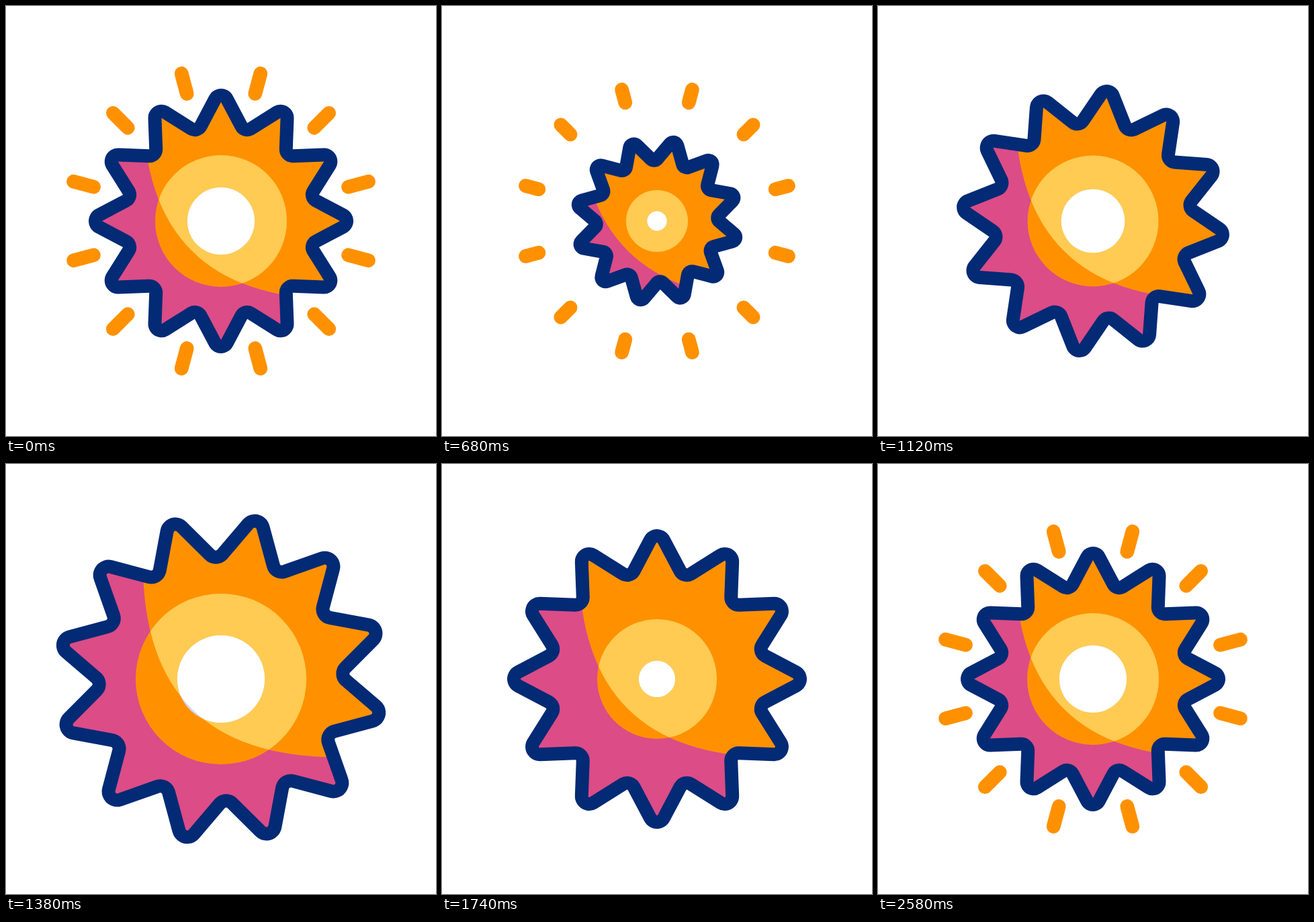
Animation of 640 by 640 pixels, one loop 2780 ms. Source, as an HTML page with a canvas:

```html
<!DOCTYPE html>
<html lang="en">
<head>
<meta charset="utf-8">
<title>Sun</title>
<style>
  html, body { margin: 0; width: 100%; height: 100%; overflow: hidden; background: #fff; }
  canvas { display: block; width: 640px; height: 640px; }
</style>
</head>
<body>
<canvas id="stage" width="640" height="640"></canvas>
<script>
const ctx = document.getElementById('stage').getContext('2d');
const LOOP = 2780, START = 220, END = 2580;
const TAU = Math.PI * 2, STEP = TAU / 12;
const NAVY = '#032a75', ORANGE = '#ff9100', PINK = '#dc4c87', YELLOW = '#ffcb52', LILAC = '#d2d8fa';

const smooth = x => x * x * (3 - 2 * x);
const soft = x => (x + smooth(x)) / 2;

// Eases from a to b while t runs from t0 to t1
function ramp(t, t0, t1, a, b, ease = smooth) {
  const x = Math.min(1, Math.max(0, (t - t0) / (t1 - t0)));
  return a + (b - a) * ease(x);
}

// Shrink, swell, dip, rebound, rest; inner parts run ahead by `lead`
function pulse(t, lead, low, dip, rebound) {
  const lowAt = 620 - lead, highAt = 1560 - lead, high = 1.4;
  if (t < lowAt) return ramp(t, START, lowAt, 1, low);
  if (t < highAt) return ramp(t, lowAt, highAt, low, high, soft);
  if (t < 1740) return ramp(t, highAt, 1740, high, dip);
  if (t < 2140) return ramp(t, 1740, 2140, dip, rebound, soft);
  return ramp(t, 2140, END, rebound, 1, soft);
}

// Winds back, then swings forward to an equal pose
const turn = t => t < 805 ? ramp(t, START, 805, 0, -20) : ramp(t, 805, 1628, -20, 60);

// Rays draw in, shoot away as dots, and later return from outside
function rayEnd(t, rest, near) {
  const windUp = x => x * x * (2.2 * x - 1.2);
  if (t < 720) return ramp(t, START, 720, rest, near, windUp);
  if (t < 1080) return ramp(t, 720, 1080, near, 310);
  return ramp(t, 1980, 2570, 261, rest);
}

// Twelve rounded tips joined to rounded valleys by their common tangents
function starPath(scale, angle) {
  const tip = 177 * scale, valley = 151 * scale, r = 10 * scale;
  const dx = valley * Math.cos(STEP / 2) - tip, dy = valley * Math.sin(STEP / 2);
  const w = Math.atan2(dy, dx) - Math.acos(2 * r / Math.hypot(dx, dy));
  const path = new Path2D();
  for (let k = 0; k < 12; k++) {
    const a = angle + k * STEP - TAU / 4, b = a + STEP / 2;
    path.arc(tip * Math.cos(a), tip * Math.sin(a), r, a - w, a + w);
    path.arc(valley * Math.cos(b), valley * Math.sin(b), r,
      a + w + Math.PI, a + STEP - w + Math.PI, true);
  }
  path.closePath();
  return path;
}

function disc(r) {
  const path = new Path2D();
  path.arc(0, 0, r, 0, TAU);
  return path;
}

// Lit side: everything up and right of a tilted parabola
const light = new Path2D();
light.addPath(new Path2D('M-300-158Q0 282 300-158V-420H-300Z'), new DOMMatrix().rotate(45));

// Fills a shape with one colour in the shade and another in the light
function twoTone(shape, shade, lit) {
  ctx.fillStyle = shade;
  ctx.fill(shape);
  ctx.save();
  ctx.clip(light);
  ctx.fillStyle = lit;
  ctx.fill(shape);
  ctx.restore();
}

function drawRays(t) {
  if (t >= 1080 && t < 1980) return;
  const outer = rayEnd(t, 227.2, 192), inner = Math.min(rayEnd(t, 196.2, 176.5), outer - .1);
  ctx.strokeStyle = ORANGE;
  ctx.lineWidth = 20.8;
  ctx.lineCap = 'round';
  ctx.beginPath();
  for (let k = 0; k < 12; k++) {
    const a = (k + .5) * STEP, c = Math.cos(a), s = Math.sin(a);
    ctx.moveTo(inner * c, inner * s);
    ctx.lineTo(outer * c, outer * s);
  }
  ctx.stroke();
}

function draw(t) {
  ctx.setTransform(1, 0, 0, 1, 0, 0);
  ctx.fillStyle = '#fff';
  ctx.fillRect(0, 0, 640, 640);
  ctx.translate(320, 320);

  drawRays(t);
  const star = starPath(pulse(t, 0, .61, 1.139, 1.0775), turn(t) * TAU / 360);
  twoTone(star, PINK, ORANGE);
  twoTone(disc(98 * pulse(t, 40, .4, .908, 1.17)), ORANGE, YELLOW);
  twoTone(disc(50 * pulse(t, 65, .18, .54, 1.24)), LILAC, '#fff');
  ctx.strokeStyle = NAVY;
  ctx.lineWidth = 20;
  ctx.lineJoin = 'round';
  ctx.stroke(star);
}

const start = performance.now();
function tick() {
  draw((performance.now() - start) % LOOP);
  requestAnimationFrame(tick);
}
tick();
</script>
</body>
</html>
```
